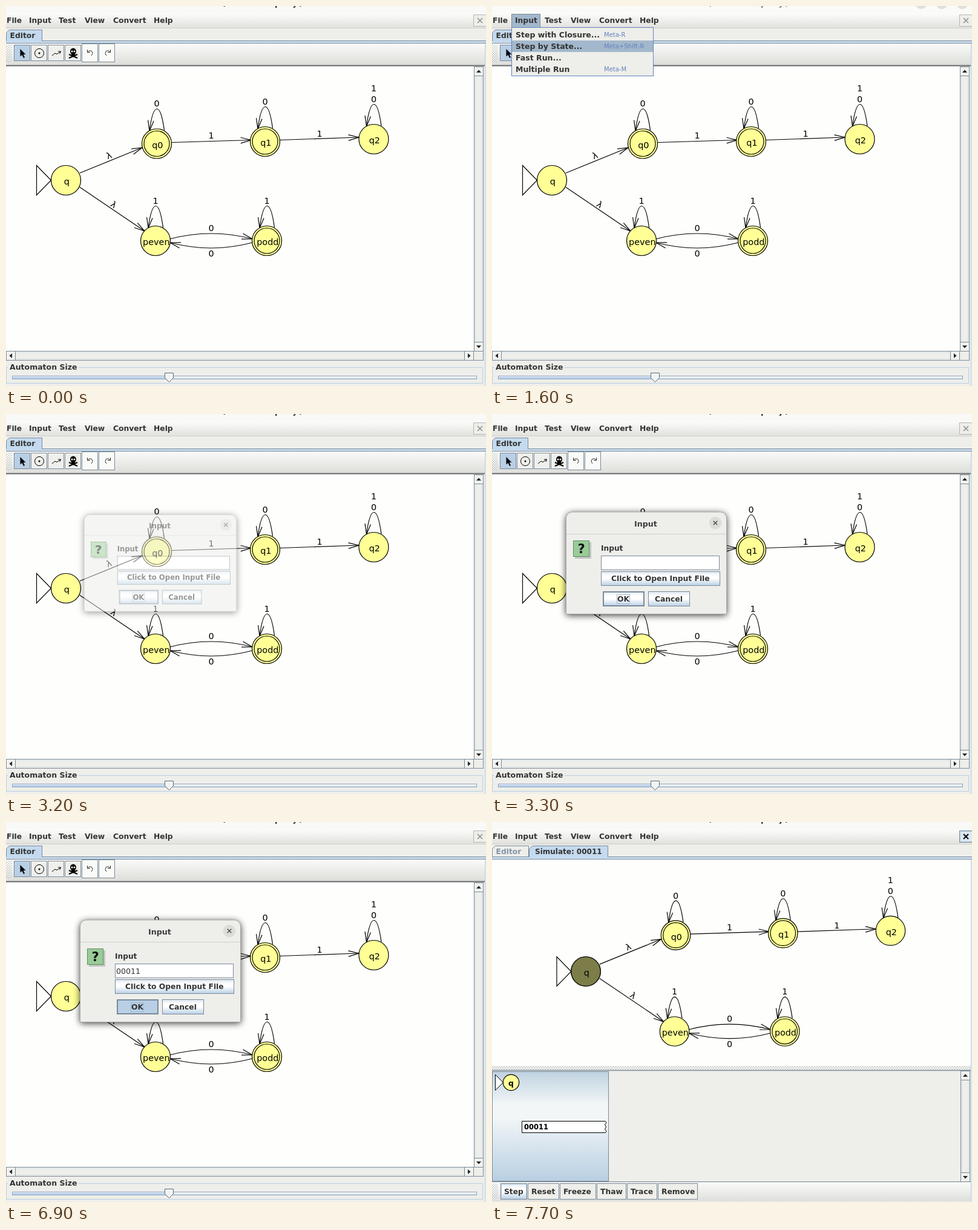
Recreate the animation shown at these times as an HTML page. Size 793 by 628 pixels, loop 8 s.

```html
<!DOCTYPE html>
<html lang="en">
<head>
<meta charset="utf-8">
<title>Automaton editor</title>
<style>
html, body { margin: 0; width: 100%; height: 100%; overflow: hidden; background: #eeeeea; }
svg { display: block; width: 793px; height: 628px; }
text { font-family: "DejaVu Sans", sans-serif; font-size: 14.4px; white-space: pre; }
.b { font-weight: bold; font-size: 12.3px; fill: #333; }
.m { text-anchor: middle; }
</style>
</head>
<body>
<svg id="stage" viewBox="0 0 793 628" xmlns="http://www.w3.org/2000/svg"></svg>
<script>
const EDGE = '#7a8a99', BLUE = '#b8cfe5', PANEL = '#eeeeea', PAPER = '#fefffd', YELLOW = '#ffff96';

const rect = (x, y, w, h, fill, extra = '') =>
  `<rect x="${x}" y="${y}" width="${w}" height="${h}" fill="${fill}" ${extra}/>`;
const box = (x, y, w, h, fill, stroke = EDGE, extra = '') =>
  rect(x + .5, y + .5, w - 1, h - 1, fill, `stroke="${stroke}" ${extra}`);
const path = (d, stroke = '#000', width = 1, fill = 'none') =>
  `<path d="${d}" fill="${fill}" stroke="${stroke}" stroke-width="${width}"/>`;
const circle = (x, y, r, fill, stroke = '#000', width = 1.2) =>
  `<circle cx="${x}" cy="${y}" r="${r}" fill="${fill}" stroke="${stroke}" stroke-width="${width}"/>`;
const text = (x, y, s, cls = '', extra = '') =>
  `<text x="${x}" y="${y}" class="${cls}" ${extra}>${s}</text>`;
const bold = (x, y, s, size = 12.3, fill = '#333') =>
  text(x, y, s, 'b', `style="font-size:${size}px;fill:${fill}"`);
const group = (id, content, extra = '') => `<g id="${id}" ${extra}>${content}</g>`;
const gradient = (id, ...stops) => `<linearGradient id="${id}" x2="0" y2="1">${
  stops.map(([at, color]) => `<stop offset="${at}" stop-color="${color}"/>`).join('')}</linearGradient>`;

const defs = `<defs>
  ${gradient('button', [0, '#dde8f1'], [.3, '#fff'], [.5, '#fff'], [1, BLUE])}
  ${gradient('bar', [0, '#fcfdfa'], [1, '#e0e0dd'])}
  ${gradient('tools', [0, '#fafbf8'], [1, '#dededb'])}
  ${gradient('config', [0, '#bfd2e1'], [.3, '#f2f6f7'], [.42, '#f2f6f7'], [1, '#b8cfe2'])}
  <pattern id="grip" width="4" height="4" patternUnits="userSpaceOnUse">
    <path d="M0 0h1v1h-1zM2 2h1v1h-1z" fill="#8f9aa3"/><path d="M1 1h1v1h-1zM3 3h1v1h-1z" fill="#fff"/>
  </pattern>
  <filter id="blur" x="-20%" y="-20%" width="140%" height="140%"><feGaussianBlur stdDeviation="6"/></filter>
</defs>`;

// Automaton
function head(x, y, angle) {
  const tip = a => `${x - 18 * Math.cos(a)} ${y - 18 * Math.sin(a)}`;
  return path(`M${tip(angle - .27)}L${x} ${y}L${tip(angle + .27)}`, '#000', 1.2);
}
// The arrow leaves its last control point (cx, cy) towards its tip (x, y).
const arrow = (start, cx, cy, x, y) =>
  path(`M${start} ${cx} ${cy} ${x} ${y}`, '#000', 1.2) + head(x, y, Math.atan2(y - cy, x - cx));
const line = (x1, y1, x2, y2) => arrow(`${x1} ${y1}L`, x1, y1, x2, y2);
const label = (x, y, s, turn = 0) =>
  text(x, y + 5.3, s, 'm', turn ? `transform="rotate(${turn} ${x} ${y})"` : '');
const loop = (x, y, s) =>
  arrow(`${x + 12.5} ${y - 22}C${x + 6} ${y - 69.5}`, x - 5.5, y - 69.5, x - 12, y - 21) + label(x, y - 66.5, s);
function state(x, y, name, final) {
  return circle(x, y, 24.5, YELLOW) + (final ? circle(x, y, 21, 'none') : '') +
    text(x + 1.3, Math.round(y + 7), name, 'm');
}

const automaton = [
  line(122, 276, 225, 234), label(170, 247, 'λ', -22),
  line(122, 299.5, 229, 372), label(178, 328, 'λ', 34),
  line(273.5, 225.5, 405, 221.5), label(339, 213.5, '1'),
  line(452.5, 221.5, 583, 217), label(518, 210.5, '1'),
  arrow('271 385Q', 339, 367, 407, 385), label(339, 367, '0'),
  arrow('407 391Q', 339, 409, 271, 391), label(339, 409, '0'),
  loop(249, 227.5, '0'), loop(428, 224, '0'), loop(607.5, 220, '0'), label(607.5, 135.5, '1'),
  loop(247, 388, '1'), loop(431, 388, '1'),
  path('M50.5 263.5L74.5 288L50.5 312.5Z', '#000', 1.2, PAPER),
  state(99, 288, 'q'), state(249, 227.5, 'q0', true), state(428, 224, 'q1', true),
  state(607.5, 220, 'q2'), state(247, 388, 'peven'), state(431, 388, 'podd', true),
].join('');

// Widgets
function scrollbar(x, y, length, flat) {
  const place = flat ? `matrix(0 1 1 0 ${x} ${y})` : `translate(${x} ${y})`;
  const end = length - 16;
  return `<g transform="${place}">` + box(0, 0, 16, length, PANEL) +
    path(`M2.5 16V${end}M13.5 16V${end}`, '#d3dfe9') +
    box(0, 0, 16, 16, '#f1f2ee') + box(0, end, 16, 16, '#f1f2ee') +
    path('M8 5.5L12 10H4Z', 'none', 0, '#222') +
    path(`M8 ${end + 10.5}L12 ${end + 6}H4Z`, 'none', 0, '#222') + '</g>';
}
const button = (x, y, w, h, s, tx, fill = 'url(#button)', size) =>
  box(x, y, w, h, fill) + bold(tx, Math.floor(y + h / 2 + 4.5), s, size);
const tab = (x, w, s, active) =>
  path(`M${x + .5} 58V44.5L${x + 5.5} 39.5H${x + w - .5}V58`, EDGE, 1, active ? '#c4daee' : PANEL) +
  bold(x + (x ? 10 : 6.5), 53, s, x ? 12 : 12.3, active ? '#333' : '#8296a8');
const tabEdge = rect(0, 58, 793, 4, '#c8ddf0') + path('M0 57.5H793M0 61.5H793', EDGE);
const cross = (x, y, r, color, width) =>
  path(`M${x - r} ${y - r}l${2 * r} ${2 * r}m0 ${-2 * r}l${-2 * r} ${2 * r}`, color, width);

const frameTop = rect(0, 0, 793, 12, '#f9f9f7') +
  text('357 444 475 484', 0, '(pj)', 'b', 'style="font-size:13px"') +
  group('unfocused', rect(0, 0, 793, 12, '#f9f9f7', 'opacity=".4"') +
    [709, 743, 777].map(x => circle(x, -5, 10, '#dededb', 'none')).join('')) +
  rect(0, 12, 793, 25, 'url(#bar)') + path('M0 36.5H793', '#cfcfcc') +
  group('menuHeader', rect(32, 13, 48, 23, '#a3b8cc') + path('M32.5 36V13.5H79.5V36', EDGE)) +
  [[1, 'File'], [38, 'Input'], [87, 'Test'], [130, 'View'], [177, 'Convert'], [244, 'Help']]
    .map(([x, s]) => bold(x, 28, s)).join('') +
  rect(0, 37, 793, 21, PANEL);

const tools = rect(0, 62, 791, 35, 'url(#tools)') + rect(0, 63, 10, 31, 'url(#grip)') +
  [13, 41, 69, 97].map((x, i) => box(x, 64, 27, 27, i ? '#efefec' : BLUE)).join('') +
  box(125, 62, 27, 31, '#fafaf8') + box(153, 62, 27, 31, '#fafaf8') +
  path('M23.5 71V83.5L26.5 80.8L29 86L31 85L28.7 80H32.5Z', 'none', 0, '#000') +
  circle(55, 78, 7.5, 'none', '#000', 1) + circle(55, 78, 1.5, '#000', 'none') +
  path('M76 82L81 78L84 79.5L90 75.5M86 75H90.5L89 79', '#000') +
  path('M104 80L118 86M118 80L104 86', '#000', 2) +
  path('M106 75a5 5.5 0 0 1 10 0q0 3 -2 4v3h-6v-3q-2 -1 -2 -4Z', 'none', 0, '#000') +
  circle(109, 75, .9, '#fff', '#fff') + circle(113, 75, .9, '#fff', '#fff') +
  path('M134.5 72V76.5H139M134.5 76.5Q138 72 142 75Q144.5 79 141 82', '#333') +
  path('M172.5 72V76.5H168M172.5 76.5Q169 72 165 75Q162.5 79 166 82', '#333') +
  path('M0 97.5H791', '#a9a9a7') + path('M0 98.8H791', '#666b70', 1.4);

const slider = box(10, 611, 768, 6, '#f5f7f6', '#8fa5bb') + rect(11, 614, 766, 2, '#d9e5f1') +
  rect(11, 613, 255, 3, '#b8d0ee') +
  path('M262.5 606.5H276.5V614.5L269.5 621.5L262.5 614.5Z', '#5a6a79', 1, '#f1f4f4');

const editor = tab(0, 60, 'Editor', true) + tabEdge + path('M1 58H59', '#c4daee', 2) + tools +
  rect(0, 100, 773, 470, PAPER) + automaton +
  scrollbar(773, 100, 471) + scrollbar(0, 570, 773, true) + box(772, 570, 17, 16, PANEL) +
  path('M791.5 62V628', BLUE) +
  box(0, 597, 788, 27, 'none', BLUE) + rect(3, 590, 117, 14, PANEL) + bold(6, 601, 'Automaton Size', 12.5) +
  slider + box(772, 14, 22, 20, PANEL, '#b5b5b2') + cross(783, 24, 4, '#8f8f8d', 1.6);

const simulator = tab(0, 61, 'Editor', false) + tab(61, 131, 'Simulate: 00011', true) + tabEdge +
  path('M62 58H191', '#c4daee', 2) + rect(0, 62, 791, 341, PAPER) +
  `<g transform="translate(57 -38.1) scale(.99)">${automaton}${circle(99, 288, 24.5, '#7d7d49')}${text(100.3, 295, 'q', 'm')}</g>` +
  rect(0, 403, 793, 225, PANEL) + rect(0, 404, 791, 5, 'url(#grip)') + path('M0 410.5H791', EDGE, 1.5) +
  box(0, 412, 193, 182, 'url(#config)') +
  path('M5.5 417.5L18.5 430.5L5.5 443.5Z', '#000', 1, '#fff') + circle(31.5, 430.5, 13.2, YELLOW) +
  bold(27, 436, 'q', 12.3, '#000') +
  path('M187.5 494.5H49.5V513.5H187.5L189 511L186.5 508L188.5 504L186.5 500L189 497Z', '#000', 1, '#fff') +
  bold(53, 508, '00011', 11.5, '#000') +
  scrollbar(774, 411, 184) + path('M0 594.5H791', EDGE) + path('M791.5 62V628', BLUE) +
  rect(0, 596, 791, 31, 'url(#tools)') + rect(0, 598, 10, 26, 'url(#grip)') +
  [[14, 44, 'Step', 20], [59, 52, 'Reset', 65], [112, 60, 'Freeze', 118], [173, 49, 'Thaw', 179],
    [223, 50, 'Trace', 229], [274, 66, 'Remove', 280]]
    .map(([x, w, s, tx]) => button(x, 597, w, 27, s, tx, '#eeeeea')).join('') +
  group('stepHover', button(14, 597, 44, 27, 'Step', 20) + box(15, 598, 42, 25, 'none', BLUE)) +
  box(772, 14, 22, 20, '#dce8f2', EDGE) + box(773, 15, 21, 18, 'none', BLUE) + cross(783, 24, 4, '#000', 2);

const menu = box(32, 35, 235, 81, PANEL, '#6382bf') + rect(33, 38, 233, 19, '#a3b8cc', 'id="highlight"') +
  [['Step with Closure...', 'Meta-R'], ['Step by State...', 'Meta+Shift-R'], ['Fast Run...', ''], ['Multiple Run', 'Meta-M']]
    .map(([s, key], i) => bold(39, 52 + 19 * i, s, 12.5) +
      text(185, 51 + 19 * i, key, '', 'style="font-size:10px;fill:#6382bf"')).join('');

const sheet = 'M122.5 330.5V172a10 10 0 0 1 10 -10H377.5a10 10 0 0 1 10 10V330.5Z';
const dialog = `<path d="${sheet}" transform="translate(0 2)" opacity=".8" filter="url(#blur)"/>` +
  path(sheet, '#a8a8a5', 1, '#eeeeeb') + path('M123 198.5H387', '#d2cfcb') +
  bold(235, 186, 'Input', 12.7, '#3d3d3d') + circle(369, 180, 10.3, '#dcdcd9', 'none') + cross(369, 180, 3.3, '#444', 1.3) +
  rect(137, 212, 27, 27, '#a5aaa5', 'opacity=".6"') + box(134, 209, 27, 27, '#99cc99', '#5f8f5f') +
  text(147.5, 230, '?', 'b m', 'style="font-size:21px;fill:#111"') +
  bold(180, 226, 'Input', 12.2) + box(180, 234, 196, 24, '#fff') +
  text(182, 251, '', '', 'id="entry" style="font-size:12.57px;fill:#333"') +
  rect(190, 239, 1, 15, '#333', 'id="caret"') +
  button(180, 260, 197, 24, 'Click to Open Input File', 197) +
  group('openHover', box(181, 261, 195, 22, 'none', BLUE, 'stroke-width="2"')) +
  button(183, 293, 69, 25, 'OK', 207) +
  group('okPressed', button(183, 293, 69, 25, 'OK', 207, BLUE)) +
  box(184, 294, 67, 23, 'none') +
  group('okHover', box(185, 295, 65, 21, 'none', BLUE)) +
  group('okFocus', box(206, 298, 22, 16, 'none', '#a0b9d4')) +
  button(258, 293, 69, 25, 'Cancel', 269);

const stage = document.getElementById('stage');
stage.innerHTML = defs + rect(0, 0, 793, 628, PANEL) + frameTop +
  group('editor', editor) + group('simulator', simulator) + group('menu', menu) + group('dialog', dialog);

const el = {};
stage.querySelectorAll('[id]').forEach(node => el[node.id] = node);
const show = (id, on) => el[id].style.display = on ? '' : 'none';

const keyTimes = [5100, 5300, 5500, 5600, 5800];

function render(t) {
  const within = (from, to) => t >= from && t < to;

  const menuOpen = within(1000, 2100);
  ['menu', 'menuHeader', 'unfocused'].forEach(id => show(id, menuOpen));
  show('highlight', t >= 1400);
  el.highlight.setAttribute('y', t < 1600 ? 38 : 57);

  show('editor', t < 7100);
  show('simulator', t >= 7100);
  show('stepHover', t >= 7700);

  show('dialog', within(3200, 7200));
  const opening = t < 3300;
  el.dialog.setAttribute('opacity', opening ? .5 : t < 7000 ? 1 : t < 7100 ? .6 : .2);
  el.dialog.setAttribute('transform', opening ? 'translate(255 246) scale(.95) translate(-255 -246)' : '');

  const typed = keyTimes.filter(time => t >= time).length;
  el.entry.textContent = '00011'.slice(0, typed);
  el.caret.setAttribute('x', 182 + 8 * typed);
  show('caret', within(4100, 4600) || within(5100, 6300) || within(6800, 6900));
  show('openHover', within(6200, 6300));
  show('okHover', within(6800, 6900));
  show('okPressed', within(6900, 7000));
  show('okFocus', t < 4100 || t >= 6900);
}

const started = performance.now();
function tick() {
  render((performance.now() - started) % 8000);
  requestAnimationFrame(tick);
}
tick();
</script>
</body>
</html>
```
